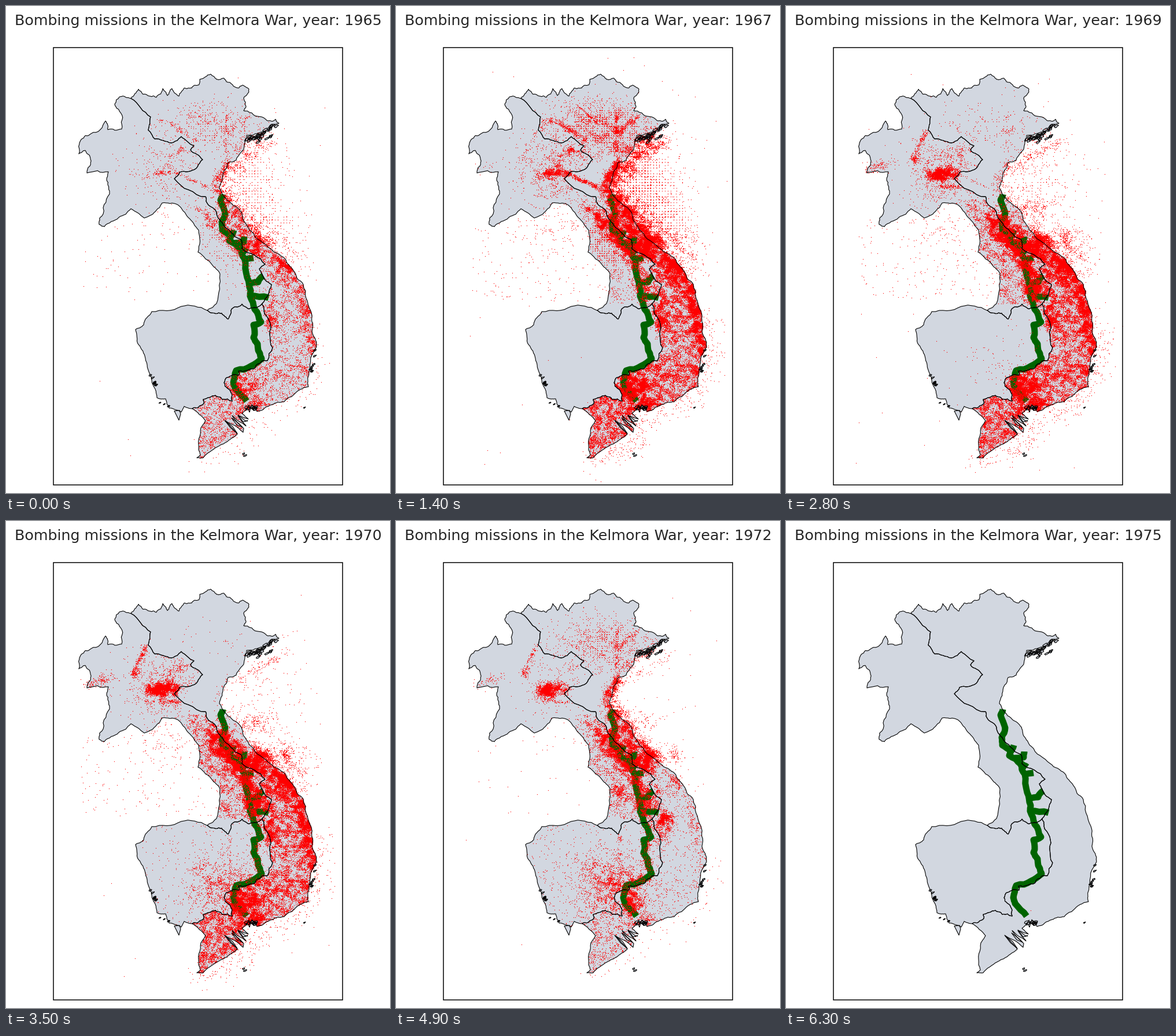
A matplotlib script for the animation above (7 s loop, 664 by 843 pixels).

```python
import numpy as np
import matplotlib.pyplot as plt
from matplotlib.animation import FuncAnimation
from matplotlib.patches import Polygon, Rectangle
from matplotlib.path import Path

W, H, DPI = 664, 843, 64
PX = 72 / DPI
LAND, TRAIL, DOT = "#d2d7e0", "#006400", "#ff0000"
YEARS = [*range(1965, 1974), 1975]


def pts(*v):
    return np.array(v, float).reshape(-1, 2)


def rough(p, seed, amp=0.16, rounds=3):
    """Break every segment at a shifted midpoint for a natural outline."""
    rng = np.random.default_rng(seed)
    for _ in range(rounds):
        d = np.diff(p, axis=0)
        normal = np.c_[-d[:, 1], d[:, 0]]
        out = np.empty((2 * len(p) - 1, 2))
        out[::2] = p
        out[1::2] = p[:-1] + d / 2 + normal * rng.uniform(-amp, amp, (len(d), 1))
        p = out
    return p


def along(line, n, rng):
    s = np.r_[0, np.cumsum(np.hypot(*np.diff(line, axis=0).T))]
    t = rng.uniform(0, s[-1], n)
    return np.c_[np.interp(t, s, line[:, 0]), np.interp(t, s, line[:, 1])]


# Borders, each shared by the two lands it divides
north = rough(pts(
    216, 160, 229, 144, 248, 156, 260, 158, 271, 143, 279, 155, 287, 143, 299, 156,
    308, 142, 321, 142, 334, 136, 335, 127, 354, 118, 364, 127, 377, 125, 381, 131,
    402, 142, 409, 137, 420, 144, 411, 160, 415, 175, 411, 181, 425, 185, 451, 198,
    466, 196, 472, 203), 1)
shore = rough(pts(
    472, 203, 457, 207, 455, 217, 436, 220, 416, 224, 411, 248, 398, 267, 384, 271,
    376, 288, 369, 316, 383, 337, 404, 353, 411, 372, 424, 390, 457, 420, 482, 437,
    497, 458, 514, 482, 527, 528, 529, 563, 537, 589, 529, 604, 522, 650, 523, 659,
    505, 666, 481, 685, 460, 690, 434, 702), 2, 0.1)
delta = rough(pts(
    434, 702, 425, 690, 421, 703, 417, 696, 408, 705, 419, 715, 401, 709, 415, 727,
    391, 709, 411, 731, 410, 738, 378, 717, 400, 741, 376, 758, 358, 768, 341, 782,
    330, 782, 336, 777, 333, 768, 337, 730, 345, 718, 322, 697), 4, 0.06)
southwest = rough(pts(
    322, 697, 342, 688, 341, 681, 362, 674, 374, 681, 391, 684, 390, 671, 377, 652,
    383, 643, 403, 639, 402, 632, 430, 627, 444, 614, 452, 614, 456, 568, 446, 528,
    443, 515), 5)
ridge = rough(pts(
    216, 160, 250, 192, 246, 215, 257, 230, 286, 237, 303, 226, 325, 242, 319, 249,
    340, 266, 329, 281, 300, 288, 291, 299, 345, 330, 346, 338, 360, 351, 374, 375,
    406, 404, 408, 420, 448, 447, 438, 455, 447, 473, 459, 482, 443, 515), 6, 0.1)
west = rough(pts(
    216, 160, 197, 157, 188, 170, 196, 182, 200, 213, 176, 214, 172, 199, 147, 221,
    130, 231, 126, 256, 137, 250, 146, 265, 140, 289, 177, 287, 174, 301, 179, 320,
    168, 360, 161, 378, 170, 382), 7)
river = rough(pts(
    170, 382, 195, 366, 216, 351, 239, 367, 258, 356, 270, 341, 297, 344, 315, 366,
    333, 388, 332, 426, 358, 450, 370, 464, 364, 515, 348, 527), 8, 0.1)
middle = rough(pts(
    348, 527, 368, 531, 384, 542, 392, 523, 408, 516, 421, 524, 443, 515), 9)
plain = rough(pts(
    348, 527, 303, 520, 252, 529, 238, 552, 224, 560, 229, 586, 241, 610, 250, 640,
    258, 663, 261, 678, 276, 680, 282, 696, 303, 703, 308, 693, 322, 697), 10, 0.1)

coast_land = np.vstack([north, shore, delta, southwest, ridge[::-1]])
inner_land = np.vstack([west, river, middle, ridge[::-1]])
plain_land = np.vstack([plain, southwest, middle[::-1]])
lands = [inner_land, coast_land, plain_land]


def islets(n, size, *v):
    """Small ragged islands scattered along a line."""
    rng = np.random.default_rng(n)
    a = np.linspace(0, 2 * np.pi, 11)[:-1]
    for x, y in along(pts(*v), n, rng) + rng.normal(0, size / 3, (n, 2)):
        r = size * rng.uniform(0.4, 1, 10)
        u, w = r * np.cos(a), 0.4 * r * np.sin(a)
        yield np.c_[x + u + w, y - 0.6 * u + w]


isles = [pts(291, 701, 300, 700, 302, 706, 299, 717, 296, 711)]
for args in [(22, 5, 414, 231, 432, 228, 466, 205), (5, 4, 432, 236, 464, 223),
             (9, 3, 250, 638, 258, 658), (9, 3, 535, 594, 530, 618, 526, 636),
             (7, 5, 418, 697, 433, 697), (4, 2, 265, 685, 283, 693),
             (2, 3, 411, 778, 413, 776), (1, 2, 515, 695, 516, 695)]:
    isles += islets(*args)
for k in range(3):
    x, y = 379 + 11 * k, 718 - 5 * k
    isles += [pts(x, y, x + 13, y + 10, x + 21 - 2 * k, y + 22 - 6 * k, x + 9, y + 12)]

trail = pts(
    375, 326, 371, 336, 379, 358, 373, 375, 374, 388, 388, 398, 386, 406, 406, 421,
    413, 438, 417, 470, 423, 492, 422, 502, 430, 525, 441, 547, 428, 552, 428, 574,
    435, 585, 440, 607, 442, 611, 424, 623, 398, 631, 393, 652, 396, 662, 416, 684)
routes = [trail, pts(388, 400, 394, 388), pts(392, 412, 411, 409, 412, 399),
          pts(406, 419, 417, 426), pts(412, 439, 428, 436),
          pts(419, 482, 436, 478, 445, 467), pts(422, 502, 454, 505)]
spine = np.vstack([along(r, 14 * len(r), np.random.default_rng(3)) for r in routes])


# Intensity of each campaign through the years
def bump(peak, width, power=2):
    return lambda y: np.exp(-abs((y - 1900 - peak) / width) ** power)


raids = bump(66.85, 1.65, 4)
spring = bump(72, 0.5)
ground = bump(68.2, 2.9, 4)
supply = bump(69.8, 2.4)
hills = bump(70, 2)
lowland = bump(71.7, 2, 4)


def air(y):
    return raids(y) + 0.4 * spring(y) + 0.012


def war(y):
    return 0.15 + 0.85 * ground(y)


def strip(width, *v):
    return lambda n, rng: along(pts(*v), n, rng) + rng.normal(0, width, (n, 2))


def blob(x, y, sx, sy):
    return lambda n, rng: rng.normal((x, y), (sx, sy), (n, 2))


def zone(x0, y0, x1, y1):
    return lambda n, rng: rng.uniform((x0, y0), (x1, y1), (n, 2))


coast = Path(coast_land).contains_points
inner = Path(inner_land).contains_points
flat = Path(plain_land).contains_points


def sea(p):
    return ~(coast(p) | inner(p) | flat(p))


parts = []


def add(level, n, draw, only=None, grid=0):
    parts.append((level, n, draw, only, grid))


# Northern rails, roads and gulf
add(raids, 330, strip(0.7, 312, 170, 350, 205))
add(raids, 650, strip(2.5, 252, 212, 257, 198, 278, 201, 330, 233))
add(air, 2300, blob(350, 212, 45, 24), coast)
add(air, 2300, blob(360, 212, 38, 22), coast, 4)
add(air, 600, strip(2, 380, 188, 381, 255))
add(air, 350, strip(3, 383, 220, 420, 190))
add(air, 900, strip(5, 385, 262, 410, 238, 450, 218))
add(raids, 900, strip(3, 268, 290, 285, 264, 302, 248, 325, 262))
add(raids, 1500, strip(2, 255, 289, 290, 287, 330, 305, 366, 322))
add(air, 3600, strip(5, 388, 272, 371, 290, 364, 318))
add(air, 10000, strip(9, 372, 322, 385, 345, 405, 375, 425, 400))
add(air, 1500, strip(3, 330, 350, 345, 352, 350, 380, 378, 383))
add(air, 3500, strip(8, 365, 360, 390, 405, 412, 430))
add(raids, 5200, strip(24, 405, 265, 425, 330, 465, 395), sea, 5)
add(raids, 2500, strip(9, 385, 300, 415, 255, 455, 235), sea)
add(raids, 1600, strip(10, 395, 335, 430, 375, 470, 410), sea)

# Inland hills
add(hills, 4800, blob(270, 291, 13, 6))
add(spring, 1700, blob(260, 295, 6, 7))
add(hills, 500, strip(3, 240, 215, 225, 262))
add(hills, 300, blob(223, 265, 3, 4))
add(hills, 350, strip(4, 268, 290, 285, 262, 315, 250))
add(hills, 300, strip(1.5, 240, 312, 300, 313))
add(hills, 250, strip(5, 140, 283, 185, 270))
add(war, 1500, blob(275, 285, 35, 35), inner)

# Supply corridor
add(supply, 15000, strip(11, 362, 370, 390, 405, 415, 430))
add(supply, 6500, strip(5, 412, 430, 419, 470, 427, 508))
add(supply, 3600, blob(440, 482, 9, 15))
add(supply, 8500, zone(310, 335, 435, 515), inner)
add(air, 2600, blob(375, 400, 25, 35), inner, 4)
add(spring, 700, blob(388, 472, 8, 9))
add(lowland, 700, strip(5, 430, 520, 441, 547, 428, 570, 442, 610))

# South, from the narrow waist to the delta
add(ground, 7500, blob(434, 416, 12, 12))
add(air, 2500, blob(430, 408, 11, 10))
add(spring, 4000, blob(434, 414, 10, 11))
add(ground, 4500, strip(8, 428, 403, 470, 435, 490, 455), coast)
add(ground, 4000, blob(481, 456, 9, 8), coast)
add(ground, 11000, strip(8, 470, 440, 495, 470, 515, 505, 522, 540, 530, 590), coast)
add(ground, 12000, zone(440, 430, 532, 565), coast)
add(spring, 1600, blob(465, 518, 7, 8))
add(war, 1700, blob(458, 540, 7, 13))
add(ground, 5200, zone(440, 560, 535, 645), coast)
add(ground, 1200, strip(5, 530, 590, 525, 640), coast)
add(ground, 10000, blob(408, 660, 17, 15), coast)
add(spring, 2400, blob(408, 657, 8, 16), coast)
add(ground, 8500, zone(400, 620, 525, 705), coast)
add(war, 1000, blob(436, 690, 9, 7), coast)
add(war, 12000, zone(318, 672, 420, 785), coast)

# Western plain
add(lowland, 3500, blob(375, 640, 32, 32), flat)
add(lowland, 1200, strip(7, 350, 626, 400, 625, 440, 612))
add(lowland, 250, strip(2, 388, 545, 385, 640))
add(lowland, 250, blob(335, 598, 6, 4))
add(lowland, 900, zone(224, 518, 456, 704), flat)

# Strays
add(war, 420, blob(440, 300, 45, 60), sea)
add(ground, 800, blob(490, 435, 20, 25), sea)
add(supply, 350, blob(425, 350, 20, 10), sea)
add(supply, 350, blob(480, 406, 9, 9), sea)
add(supply, 200, strip(5, 400, 275, 480, 232), sea)
add(war, 330, zone(130, 370, 370, 510), sea)
add(war, 180, blob(270, 378, 28, 22), sea)
add(war, 750, strip(14, 540, 540, 542, 620, 500, 690, 430, 712, 410, 760, 330, 785), sea)
add(war, 80, zone(120, 95, 562, 805))

# Patches that stay in place through the years
wave = np.random.default_rng(77)
length, turn, phase = (wave.uniform(a, b, 18) for a, b in [(6, 34), (0, 6.28), (0, 6.28)])


def density(p):
    u = p[:, :1] * np.cos(turn) + p[:, 1:] * np.sin(turn)
    f = np.sin(2 * np.pi * u / length + phase).sum(1) / 3
    return 1 / (1 + np.exp(0.6 - 3 * f))


def dots(year):
    groups = [pts(422.5, 674, 282, 692)]
    rng = np.random.default_rng(year)
    for level, n, draw, only, grid in parts:
        p = draw(int(n * level(year) * (year < 1974)), rng)
        if only and len(p):
            p = p[only(p)]
        p = p[rng.random(len(p)) < 0.15 + density(p)]
        if grid:
            p = np.round(p / grid) * grid + rng.normal(0, 0.3, p.shape)
        groups.append(p)
    p = np.vstack(groups)
    near = np.zeros(len(p), bool)
    for x, y in spine:
        near |= (p[:, 0] - x) ** 2 + (p[:, 1] - y) ** 2 < 20
    # The trail stays partly visible below the dots
    return p[rng.random(len(p)) < np.where(near, 0.35, 1)]


clouds = [dots(y) for y in YEARS]

fig = plt.figure(figsize=(W / DPI, H / DPI), dpi=DPI, facecolor="white")
ax = fig.add_axes([0, 0, 1, 1])
ax.set(xlim=(0, W), ylim=(H, 0))
ax.axis("off")

for shape in lands + isles:
    ax.add_patch(Polygon(shape, fc=LAND, ec="none", zorder=1))
    ax.add_patch(Polygon(shape, fc="none", ec="black", lw=1.1 * PX, joinstyle="round", zorder=4))
for k, line in enumerate(routes):
    ax.plot(*rough(line, 20 + k, 0.1, 2).T, color=TRAIL, lw=11 * PX, zorder=2,
            solid_capstyle="butt", solid_joinstyle="round")
frame = Rectangle((82, 72), 500, 757, fc="none", ec="black", lw=1.5 * PX, zorder=5)
ax.add_patch(frame)

cloud = ax.scatter([], [], s=(1.25 * PX) ** 2, c=DOT, linewidths=0, zorder=3)
cloud.set_clip_path(frame)
title = ax.text(332, 33, "", ha="center", va="baseline", color="#262626",
                family="DejaVu Sans", fontsize=25.4 * PX)


def draw(i):
    cloud.set_offsets(clouds[i])
    title.set_text(f"Bombing missions in the Kelmora War, year: {YEARS[i]}")
    return cloud, title


anim = FuncAnimation(fig, draw, frames=len(YEARS), init_func=lambda: draw(0),
                     interval=700, repeat=True, repeat_delay=0)
plt.show()
```
